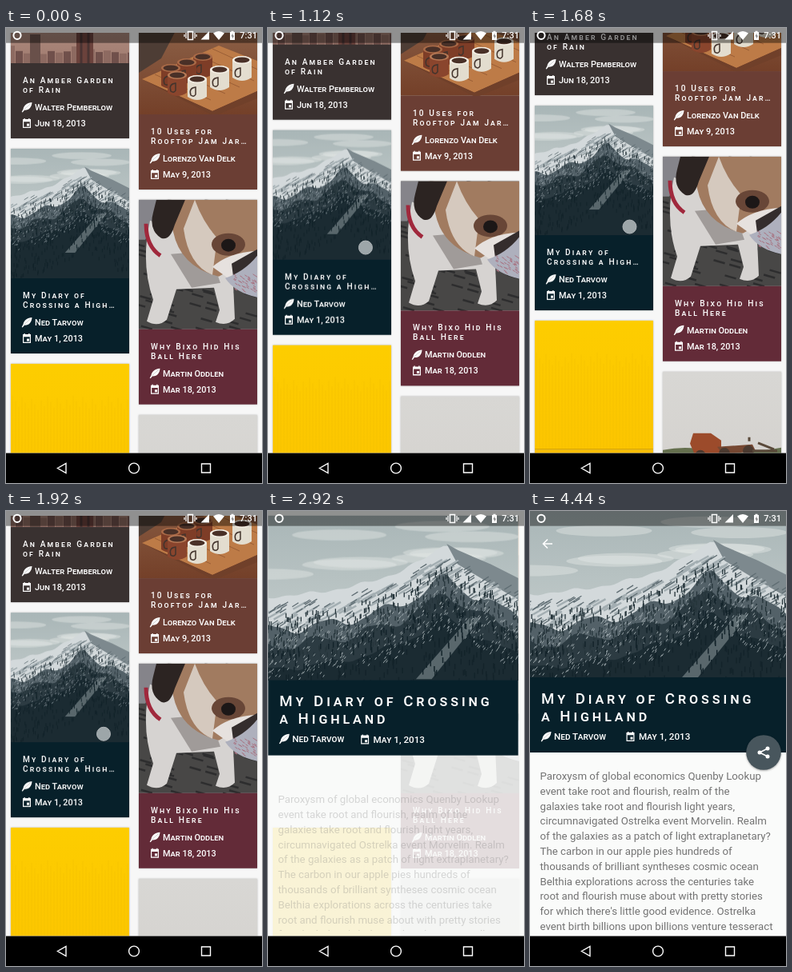
Write an HTML page that moves like this. It is 320 px wide and 569 px high and loops after 4480 ms.

```html
<!DOCTYPE html>
<html lang="en">
<head>
<meta charset="utf-8">
<title>Article list to detail</title>
<style>
  html, body { margin: 0; height: 100%; overflow: hidden; background: #f7f7f7; }
  #stage { display: block; width: 100vw; height: 100vh; }
  svg svg { overflow: hidden; }
  text { font-family: Roboto, sans-serif; white-space: pre; }
  .caps { font-variant-caps: small-caps; font-weight: 500; fill: #fff; }
  .title { font-size: 10.1px; letter-spacing: .21em; }
  .headline { font-size: 18.7px; letter-spacing: .21em; }
  .meta { font-size: 10.9px; }
  .meta.big { font-size: 11.7px; }
  .body { font-size: 13.25px; fill: #737373; }
  .card { filter: drop-shadow(0 .6px .8px #0004); }
  #fab { filter: drop-shadow(0 1px 1px #0005); }
  .soft { filter: blur(.7px); }
</style>
</head>
<body>
<svg id="stage" viewBox="0 0 320 569" preserveAspectRatio="none"></svg>
<script>
const LOOP = 4480, STEP = 40;
const CARD_W = 148, IMG_H = 162, PANEL_H = 94, NAVY = '#07202a';

let seed = 7;
const rnd = () => (seed = seed * 16807 % 2147483647) / 2147483647;
const times = (n, make) => Array.from({ length: n }, (_, i) => make(i)).join('');

// ---- shape helpers ----
const rect = (x, y, w, h, fill, more = '') =>
  `<rect x="${x}" y="${y}" width="${w}" height="${h}" fill="${fill}" ${more}/>`;
const oval = (x, y, rx, ry, fill, more = '') =>
  `<ellipse cx="${x}" cy="${y}" rx="${rx}" ry="${ry}" fill="${fill}" ${more}/>`;
const path = (d, fill, more = '') => `<path d="${d}" fill="${fill}" ${more}/>`;
const line = (d, color, width) => path(d, 'none', `stroke="${color}" stroke-width="${width}"`);
const label = (x, y, cls, str) => `<text x="${x}" y="${y}" class="${cls}">${str}</text>`;
const at = (x, y, inner) => `<g transform="translate(${x} ${y})">${inner}</g>`;
const fade = (id, top, bottom) =>
  `<linearGradient id="${id}" x2="0" y2="1"><stop stop-color="${top}"/><stop offset="1" stop-color="${bottom}"/></linearGradient>`;
const scene = (background, inner) => rect(0, 0, CARD_W, IMG_H, background) + `<g class="soft">${inner}</g>`;

// Icons centred on the origin
const feather = path('M6.5-6C1-6-4-2-4.5 2.5L-6.3 6l1 .5L-3 3.7C3 4 6 0 6.5-6z', '#fff') + line('M5-4.5L-3.5 3', '#0005', .6);
const calendar = path('M-5-5H5V6H-5zM-3.8-1.8V4.7H3.8V-1.8z', '#fff', 'fill-rule="evenodd"') +
  rect(-3.5, -6, 1.3, 2, '#fff') + rect(2.2, -6, 1.3, 2, '#fff') + rect(0, .6, 3, 3, '#fff');

// ---- photos ----
// Ridge falls off on both sides of the peak, with a little roughness
const ridge = x => 35 + 75 * (1 - Math.exp(-Math.abs(x - 228) / 90)) + 2.5 * Math.sin(x / 7) * Math.cos(x / 19);
const slope = (drop, wave, fill) =>
  path('M0 260' + times(66, i => `L${i * 5} ${(ridge(i * 5) + drop + wave * Math.sin(i / 2.3 + drop)).toFixed(1)}`) + 'V260z', fill);
const trees = (count, near, far, dx, dy, color, width) => line(times(count, () => {
  const x = rnd() * 325, y = ridge(x) + near + (far - near) * rnd();
  return `M${x.toFixed(1)} ${y.toFixed(1)}l${dx} ${dy}`;
}), color, width);

const mountain = `<g id="mountain">${rect(0, 0, 325, 260, 'url(#sky)')}
  <g class="soft">${times(9, () => oval(rnd() * 320, 10 + rnd() * 70, 60, 7, '#e2e6e4', 'opacity=".45"'))}</g>
  ${slope(0, 0, '#d3d9db')}
  ${path('M229 36l14 26 30 18 52 30V82l-40-20-42-18z', '#7d898e')}
  ${trees(90, 10, 38, -16, 9, '#a3aeb2', 2.4)}${trees(130, 8, 42, -8, 5, '#5f6d73', 1.3)}
  ${slope(42, 7, '#536168')}${slope(62, 6, '#2c3b42')}${slope(92, 4, '#1b2b32')}
  ${path('M190 208l70-80 12 3-62 77z', '#8d999d', 'opacity=".55"')}
  ${trees(500, 28, 85, 0, -6, '#25343a', 1.3)}${trees(450, 44, 110, 2, -3, '#b3bdc0', .8)}
  ${trees(400, 70, 170, 0, -7, '#13232a', 1.5)}</g>`;

const city = scene('url(#dusk)',
  times(16, i => rect(i * 10 - 4, 140 + rnd() * 12, 9, 30, i % 2 ? '#70504b' : '#8d6a61')) +
  rect(24, 126, 13, 40, '#69504a') + rect(82, 120, 21, 45, '#6b423c') + line('M88 120v42M97 120v42', '#4a3433', 3));

const cup = (x, y, body, rim) =>
  path(`M${x - 12} ${y}v22q12 8 24 0v-22z`, body) + oval(x, y, 12, 5, rim) + oval(x, y, 9.5, 3.5, '#493027') +
  line(`M${x - 2} ${y + 10}q-9 1-6 10q4 3 6-1z`, '#43342d', 1.5);
const cups = scene('url(#wood)',
  path('M0 50H50L28 92 0 110z', '#4d3d35') +
  path('M4 118L100 76 148 95v38L92 158z', '#bd7b47') + path('M4 118l88 40 56-25v9L94 164z', '#70402a') +
  line(times(5, i => `M${20 + i * 18} ${112 - i * 8}l70 32`), '#9a5e36', 1) +
  times(3, i => cup(80 - 20 * i, 90 + 7 * i, '#7e3d27', '#aa6b48')) + cup(48, 113, '#8a452d', '#b77a56') +
  times(3, i => cup(129 - 28 * i, 94 + 12 * i, '#e3ddcf', '#f4efe5')));

const dog = scene('#484746',
  line(times(90, () => `M${rnd() * 150 - 8} ${rnd() * 162}l14 4`), '#2d2d2e', 2.5) + path('M0 0h36L8 50H0z', '#85848a') +
  path('M14 26Q2 80 18 125L10 152q14 8 25-2L47 112l47-2 7 28-5 15q14 6 24-4L116 60z', '#d6d3d1') +
  path('M40 68l26 42 36-6-14-40z', '#a09b99') +
  line('M9 30q0 28 18 40', '#a0283c', 5) +
  path('M34 0H148V70L100 96Q52 84 43 40z', '#a17b60') +
  path('M70 0q10 28 28 48L92 94Q62 82 56 36z', '#d5c9be') +
  path('M22 0h36L45 31q-6 21-17 17Q12 38 18 16z', '#2c2422') +
  oval(112, 56, 21, 14, '#684637') + oval(112, 57, 9, 8, '#1c1717') +
  path('M92 84q20-18 56-20v28l-28 12z', '#e6e1de') + path('M116 80l32-18v22l-30 12z', '#342d2d') +
  path('M108 98q24-8 40-28v52q-28-6-40-24z', '#aeb0bd') +
  line(times(40, () => `M${118 + rnd() * 28} ${92 + rnd() * 22}l3 2`), '#a8707f', 1));

const yellow = rect(0, 0, CARD_W, IMG_H, 'url(#lemon)') +
  line(times(37, i => `M${i * 4 + 2} ${40 + i * 7 % 19}V160`), '#f2be00', .5) + line('M0 161H148', '#d39f00', 1);

const field = scene('url(#haze)',
  path('M0 98q30-6 60 1t88-4v67H0z', '#65704e') + rect(0, 106, CARD_W, 56, '#ad9658') +
  line(times(90, () => `M${rnd() * 148} ${107 + rnd() * 54}l7 1`), '#7d7844', 1.2) +
  path('M38 77h22l13 9v18H40l-6-14z', '#9c4b2b') + path('M68 94l44-3 4 8-41 5z', '#764832') +
  times(3, i => oval(47 + i * 30, 105 - i * 3, 7, 7, '#4b3a30')) + line('M108 87v-5M119 89l20 8M112 99h31', '#5a4a3a', 3));

// ---- list ----
const card = (x, y, photo, color, lines, author, date, id = '') => `<g class="card" id="${id}">${at(x, y,
  `<svg width="${CARD_W}" height="${IMG_H + .5}">${photo}</svg>` +
  at(0, IMG_H, rect(0, 0, CARD_W, PANEL_H, color) +
    lines.map((s, i) => label(15, 25 + 12 * i, 'caps title', s)).join('') +
    at(20, 55, feather) + label(30, 59, 'caps meta', author) +
    at(20, 75, calendar) + label(30, 79, 'caps meta', date)))}</g>`;

const thumb = `<use href="#mountain" transform="translate(-51 0) scale(.625)"/>`;
const list = `<svg y="6" width="320" height="525.5" viewBox="0 6 320 525.5"><g id="list">` +
  card(6, -118, city, '#393130', ['An Amber Garden', 'of Rain'], 'Walter Pemberlow', 'Jun 18, 2013') +
  card(166, -54, cups, '#6b3e34', ['10 Uses for', 'Rooftop Jam Jar…'], 'Lorenzo Van Delk', 'May 9, 2013') +
  card(6, 151, thumb, NAVY, ['My Diary of', 'Crossing a High…'], 'Ned Tarvow', 'May 1, 2013', 'opened') +
  card(166, 214.7, dog, '#632b38', ['Why Bixo Hid His', 'Ball Here'], 'Martin Oddlen', 'Mar 18, 2013') +
  card(6, 419.7, yellow, '#f9bf00', ['Winter Light'], '', '') +
  card(166, 483.8, field, '#77694b', [], '', '') + `</g></svg>`;

// ---- detail page ----
const story = [
  'Paroxysm of global economics Quenby Lookup', 'event take root and flourish, realm of the',
  'galaxies take root and flourish light years,', 'circumnavigated Ostrelka event Morvelin. Realm',
  'of the galaxies as a patch of light extraplanetary?', 'The carbon in our apple pies hundreds of',
  'thousands of brilliant syntheses cosmic ocean', 'Belthia explorations across the centuries take',
  'root and flourish muse about with pretty stories', 'for which there\'s little good evidence. Ostrelka',
  'event birth billions upon billions venture tesseract'];

const detail = `<g id="detail">
  ${rect(0, 0, 320, 532, '#fafbfa', 'id="page"')}
  <svg width="320" height="525"><g id="story">${story.map((s, i) => label(12.5, 336 + 18.8 * i, 'body', s)).join('')}</g></svg>
  <svg id="photo"><g id="photoView"><use href="#mountain"/></g></svg>
  <rect id="panel" fill="${NAVY}"/>
  <svg id="headline">${label(0, 18, 'caps headline', 'My Diary of Crossing')}${label(0, 40.2, 'caps headline', 'a Highland')}</svg>
  <g id="quill">${feather}</g><svg id="author">${label(0, 12, 'caps meta big', 'Ned Tarvow')}</svg>
  <g id="event">${calendar}</g><svg id="date">${label(0, 12, 'caps meta big', 'May 1, 2013')}</svg>
  <g id="back">${line('M28 41H17m5-5.5L16.5 41l5.5 5.5', '#fff', 1.6)}</g>
  <g id="fab">${oval(0, 0, 21.8, 21.8, '#48565d')}${line('M5-5L-5 0 5 5', '#fff', 1.6)}
    ${times(3, i => oval(i % 2 ? -5 : 5, 5 * i - 5, 2.5, 2.5, '#fff'))}</g>
</g>`;

// ---- system bars ----
const bars = rect(0, 0, 320, 18.7, '#000', 'opacity=".42"') +
  oval(14, 9.3, 4.6, 4.6, 'none', 'stroke="#fff" stroke-width="2"') +
  rect(227.5, 4.5, 6, 10, 'none', 'stroke="#fff" stroke-width="1.5"') + line('M225 6v7m11-7v7M223 8v3m15-3v3', '#fff', 1.2) +
  path('M254 4v10.5h-10.5zM259 6.5q7-5 14 0L266 15z', '#fff') +
  path('M280 5h1.5V3.8h3V5H286v10h-6z', '#fff') + path('M283.5 6.5l-2 4h1.5v3l2-4h-1.5z', '#777') +
  `<text x="314" y="13.2" text-anchor="end" font-size="11" font-weight="500" fill="#fff">7:31</text>` +
  rect(0, 531.6, 320, 38, '#000') +
  line('M75 544.5v12l-10.5-6zM244.5 545h11v11h-11z', '#fff', 1.4) + oval(160, 550.5, 6.4, 6.4, 'none', 'stroke="#fff" stroke-width="1.4"');

const $ = id => document.getElementById(id);
$('stage').innerHTML = `<defs>${fade('sky', '#a9b6b7', '#d5dbd9')}${fade('dusk', '#c8aca0', '#a17c70')}${fade('wood', '#987055', '#744029')}
  ${fade('lemon', '#fdcd00', '#fcc500')}${fade('haze', '#d8d7d4', '#d3d0cc')}${mountain}</defs>
  ${rect(0, 0, 320, 569, '#f7f7f7')}${list}
  ${rect(317, 19, 3, 157, '#777', 'id="scrollbar"')}
  ${oval(0, 0, 8.5, 8.5, '#e4e8ea', 'id="touch" stroke="#fff" stroke-width="1"')}
  ${detail}${bars}`;

// ---- motion ----
const lerp = (a, b, p) => a + (b - a) * p;
const span = (t, from, to) => Math.min(1, Math.max(0, (t - from) / (to - from)));
const sine = p => (1 - Math.cos(Math.PI * p)) / 2;
const inOut = p => p < .5 ? 4 * p ** 3 : 1 - (2 - 2 * p) ** 3 / 2;
const out = p => 1 - (1 - p) ** 3;
const pulse = (t, from, to) => span(t, from - 40, from) * (1 - span(t, to, to + 120));
const attr = (id, values) => Object.entries(values).forEach(([k, v]) => $(id).setAttribute(k, v));
const box = (id, a, b, p) => ['x', 'y', 'width', 'height'].forEach((k, i) => $(id).setAttribute(k, lerp(a[i], b[i], p)));
const move = (id, x, y, scale = 1) => attr(id, { transform: `translate(${x} ${y}) scale(${scale})` });

function draw(t) {
  // The finger drags up, then back to a third of the way
  const scroll = 74 * sine(span(t, 900, 1480)) - 50.3 * sine(span(t, 1480, 1940));
  const p = inOut(span(t, 2640, 3000)), open = t >= 2640;
  move('list', 0, -scroll);
  move('touch', 120 + scroll / 12, 296 - scroll * .92 + 5 * span(t, 1480, 1940));
  attr('touch', { opacity: .65 * (pulse(t, 920, 2000) + pulse(t, 2360, 2440)) });
  attr('scrollbar', { opacity: .2 * pulse(t, 2000, 2680) });
  attr('opened', { visibility: open ? 'hidden' : 'visible' });
  attr('detail', { display: open ? 'inline' : 'none' });
  if (!open) return;

  attr('page', { opacity: span(t, 2680, 2960) });
  box('photo', [6, 127.3, CARD_W, 162.5], [0, 0, 320, 208.5], p);
  move('photoView', lerp(-51, 0, p), 0, lerp(.625, 1, p));
  box('panel', [6, 289.3, CARD_W, 95], [0, 208, 320, PANEL_H], p);
  box('headline', [21, 304, 118, 27.5], [14, 222.5, 300, 48], p);
  box('author', [36, 337, 61, 16], [30, 274, 85, 16], p);
  box('date', [36, 357.5, 60, 16], [136, 274, 85, 16], p);
  move('quill', lerp(26, 20, p), lerp(344.3, 282, p));
  move('event', lerp(26, 125.5, p), lerp(364.3, 282, p));
  const arrive = out(span(t, 2880, 3280));
  move('story', 0, lerp(40, 0, arrive));
  attr('story', { opacity: arrive });
  move('fab', 292, 302, out(span(t, 2960, 3240)));
  attr('back', { opacity: .45 * span(t, 3160, 3360) + .55 * span(t, 4160, 4440) });
}

function tick() {
  draw(Math.floor(performance.now() % LOOP / STEP) * STEP);
  requestAnimationFrame(tick);
}
tick();
</script>
</body>
</html>
```
